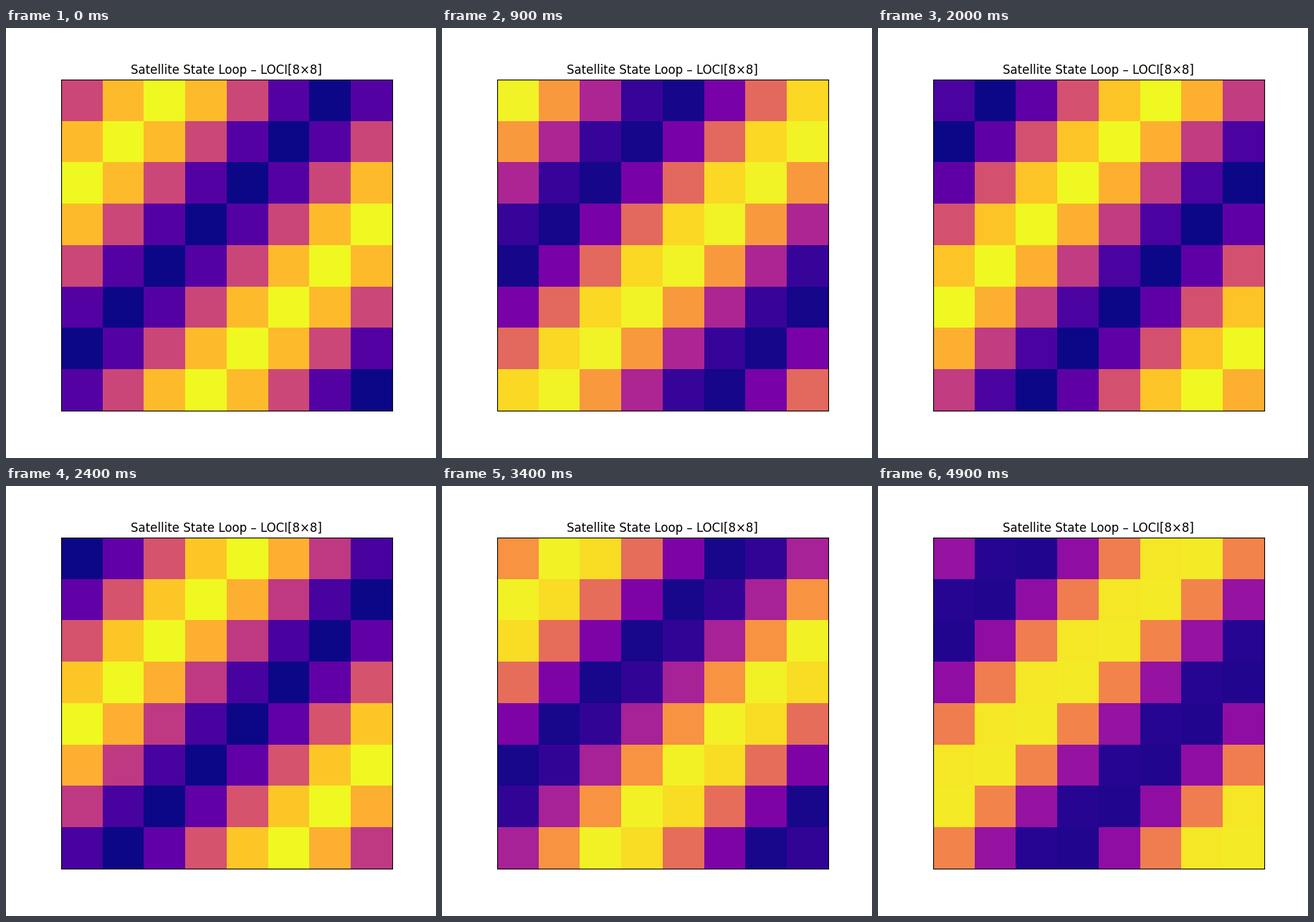
A matplotlib script that plays this animation: 600 px wide and 600 px high, repeating every 5 s.

```python
import matplotlib.pyplot as plt
import numpy as np
from matplotlib.animation import FuncAnimation

SIZE = 8
FRAMES = 50
INTERVAL_MS = 100
PHASE_STEP = 0.2  # radians per frame

rows, cols = np.indices((SIZE, SIZE))
cell_phase = (rows + cols) * 2 * np.pi / SIZE


def state(frame):
    """Diagonal sine wave travelling across the grid."""
    return np.sin(cell_phase + PHASE_STEP * frame)


fig, ax = plt.subplots(figsize=(6, 6), dpi=100)
image = ax.imshow(state(0), cmap="plasma", vmin=-1, vmax=1)
ax.set_title("Satellite State Loop – LOCI[8×8]")
ax.set_xticks([])
ax.set_yticks([])


def update(frame):
    image.set_data(state(frame))
    return [image]


animation = FuncAnimation(fig, update, frames=FRAMES, interval=INTERVAL_MS,
                          repeat=True, repeat_delay=0)
plt.show()
```
